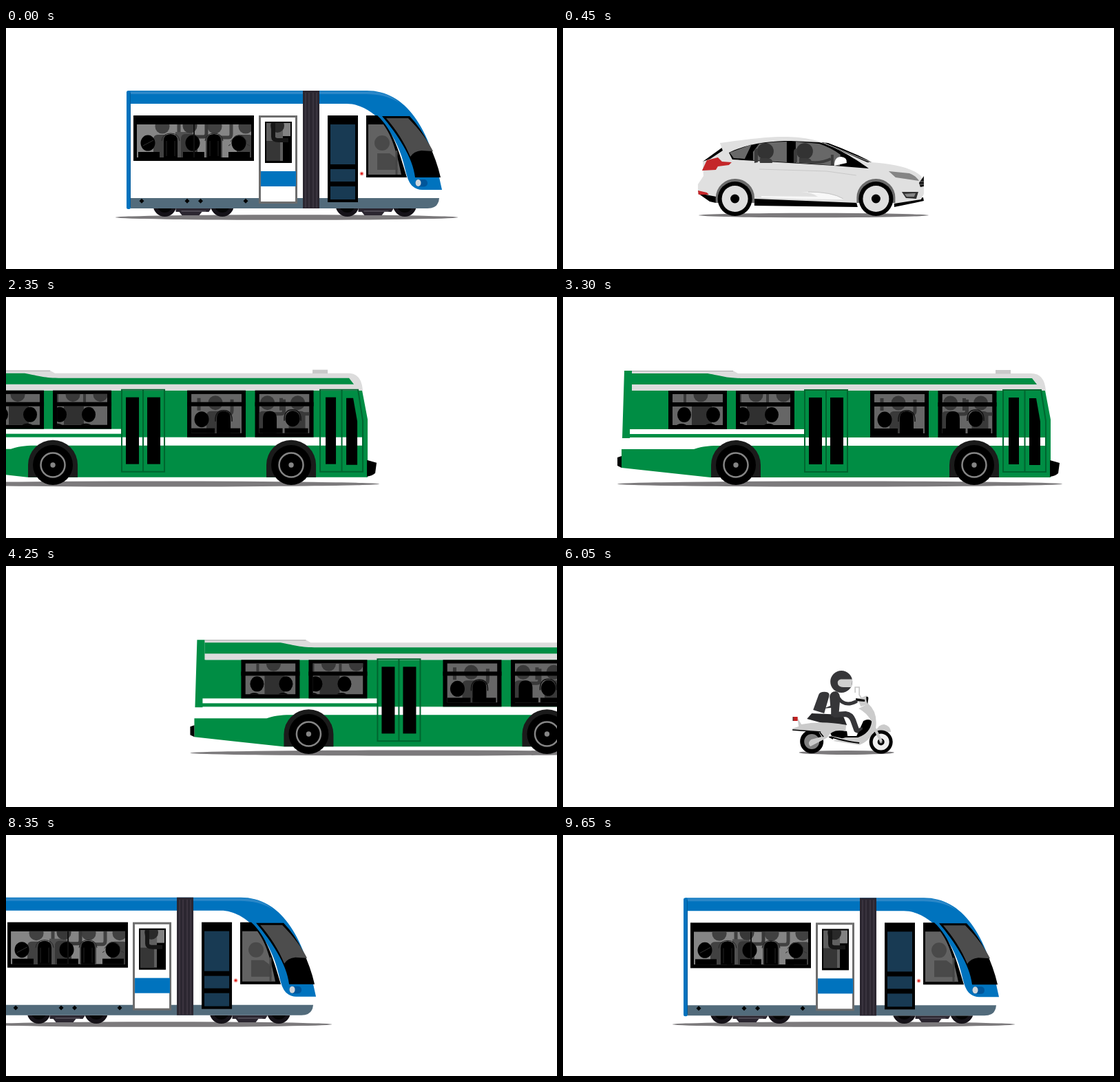
These frames come from a looping animation (800 px wide and 350 px high, 9700 ms). An HTML page:

```html
<!DOCTYPE html>
<html>
<head>
<meta charset="utf-8">
<style>
html, body { margin: 0; width: 100%; height: 100%; overflow: hidden; background: #fff }
svg { display: block }
</style>
</head>
<body>
<svg id="stage" width="800" height="350"></svg>
<script>
const LOOP = 9700, SLOT = 2000, SLIDE = 600, WIDTH = 800;
const BLUE = '#0073be', GREEN = '#008d44', YELLOW = '#ffbf00', DARK = '#363639', SHADOW = '#7c7a7c';

const path = (d, fill, more = '') => `<path d="${d}" fill="${fill}" ${more}/>`;
const line = (d, stroke, w = 1) => path(d, 'none', `stroke="${stroke}" stroke-width="${w}"`);
const rect = (x, y, w, h, fill, more = '') =>
  `<rect x="${x}" y="${y}" width="${w}" height="${h}" fill="${fill}" ${more}/>`;
const oval = (x, y, rx, ry, fill, more = '') =>
  `<ellipse cx="${x}" cy="${y}" rx="${rx}" ry="${ry}" fill="${fill}" ${more}/>`;
const dot = (x, y, r, fill, more) => oval(x, y, r, r, fill, more);
const each = (list, f) => list.map(f).join('');
const clip = (x, y, w, h, inner) =>
  `<svg x="${x}" y="${y}" width="${w}" height="${h}" viewBox="${x} ${y} ${w} ${h}">${inner}</svg>`;
const stander = (x, y, c = '#393939') =>
  dot(x, y, 10.5, c) + rect(x - 13, y + 12, 24, 50, c, 'rx="6"') +
  line(`M${x + 6} ${y + 16}h14q4 0 4-5v-16`, c, 5);
const head = (x, y) => oval(x, y, 10.5, 11.5, '#000');
const sitter = (x, y) => path(`M${x - 10} ${y + 20}v-21q0-11 10-11t10 11v21z`, '#000');
const headset = (x, y) => line(`M${x - 12} ${y + 3}v-4q1-12 12-12t12 12v4`, '#111', 1.5);

function tram() {
  const truck = x => each([x, x + 83.5], c => dot(c, 257, 17, '#151218') + dot(c, 257, 11, '#050505')) +
    path(`M${x + 16} 261h52l-4 6h-10l-4 5h-25l-4-5h-5z`, '#2b2630') +
    line(`M${x + 24} 266h36`, '#57525c', 1.5);
  const crowd = clip(190, 140, 166, 48,
    rect(190, 140, 166, 48, '#858585') +
    each([227, 303, 348], x => stander(x, 143, '#414141')) + rect(246, 151, 25, 40, '#505050') +
    stander(267, 142, '#383838') +
    each([206, 271, 338], x => head(x, 167)) +
    each([239, 302], x => path(`M${x - 10} 190v-26q0-10 10-10t10 10v26z`, '#000') +
      line(`M${x - 13} 164q1-11 13-11t13 11M${x - 6} 164v22M${x + 6} 164v22`, '#252525')) +
    line('M199 171l15-8M326 165q12-18 24 0M326 169l-3 2M350 169l4 2', '#303030') +
    each([192, 257, 323], x => rect(x, 180, 31, 9, '#000')) + rect(272, 140, 2, 48, '#111'));
  const body =
    path('M176 91H524C580 91 616 144 633 234L629 250Q624 262 612 262H176Z', '#fff') +
    path('M181 247H629Q628 262 612 262H181Z', '#526b7b') +
    path('M178 91H524C580 91 616 144 633 235H604C586 234 583 219 579 203C568 152 532 110 495 110H178Z', BLUE) +
    path('M181 92H524C546 92 561 99 572 109C556 99 540 96 523 96H181Z', '#2b87c8') +
    rect(175, 91, 6, 172, BLUE, 'rx="2.5"') + line('M180.5 94V260', '#005a9c') +
    rect(185, 127, 175, 66, '#000') + crowd +
    each([197, 263, 282.5, 348], x => path(`M${x - 3.5} 251.3l3.5-3.5 3.5 3.5-3.5 3.5z`, '#000')) +
    rect(368.5, 128.5, 53, 125, '#fff', 'stroke="#6d6d6d" stroke-width="3"') +
    rect(370, 208, 51, 22, BLUE) + rect(376, 136, 39, 60, '#000') +
    clip(378, 138, 35, 55, rect(378, 138, 24, 55, '#5f5f5f') + rect(402, 138, 11, 19, '#828282') +
      dot(394, 142, 10, '#292929') + rect(378, 164, 20, 30, '#363636') +
      line('M388 138v20q0 5 8 5h14', '#161616', 6)) +
    rect(431, 91, 24, 171, '#2b2630') + each([435, 440, 446, 451], x => line(`M${x} 94V261`, '#413a45', 1.5)) +
    rect(467, 127, 44, 126, '#000') +
    each([[140, 58], [205, 18], [230, 19]], ([y, h]) => rect(471, y, 36, h, '#183a53')) +
    dot(516.5, 211.5, 3, '#f3b0aa') + dot(516.5, 211.5, 1.7, '#d22') +
    path('M523 127H539C562 148 571 180 582 217H523Z', '#000') +
    path('M526 140H548C561 158 567 180 574 213H526Z', '#626262') +
    dot(546, 167, 11, '#494949') + path('M539 182h18l8 6 4 18h-30z', '#494949') + line('M567 178v35', '#444', 3) +
    path('M546 128H586C608 151 623 183 631 217H594C591 188 568 154 546 128Z', '#000') +
    path('M552 131H584C601 148 614 166 620 179L603 178Q592 179 587 187C579 167 566 147 552 131Z', '#4d4d4d') +
    rect(594, 220, 18, 10.5, '#00569a', 'rx="5"') + oval(598.5, 225, 4, 5, '#ced5db');
  return [0, oval(407.5, 275, 248.5, 3.8, SHADOW) + truck(230.5) + truck(495.5), body, ''];
}

function car() {
  const wheel = x => dot(x, 248, 25, '#000') + dot(x, 248, 19, '#dedede') + dot(x, 248, 6.5, '#000');
  const arch = x => path(`M${x - 28} 254v-8a28 27 0 0 1 56 0v8z`, '#6c6c6c');
  const rider = x => dot(x, 179, 12, '#333') + path(`M${x - 16} 196v-16q0-5 5-5v20zm8 0h18q1-7-8-7h-10z`, '#3b3b3b');
  const body =
    path('M277 247L425 253 427 260 277 258ZM195 240L221 243V254L212 252ZM480 254L522 246 523 251Q500 256 480 260Z', '#000') +
    path('M202 194L231 173 236 177 213 191Z', '#000') +
    path('M227 167C270 161 297 158 320 158C347 158 368 163 378 167L446 195C480 197 508 204 519 215L523 224V241L519 249 480 255 427 254 277 248 222 245 195 240V227L203 215 202 194 213 190 231 178Z', '#e0e0e0') +
    path('M201 207L208 192 224 188 230 194 244 195 240 199 224 201 221 206ZM195 236L208 239 211 242 196 242Z', '#c4272a') +
    path('M240 181C270 167 300 164 330 164L371 166C391 171 420 187 443 204L393 200 245 191Z', '#000') +
    path('M241 181L273 169 263 190 247 189ZM284 168Q304 165 324 165V195L275 192V180ZM337 165L371 168Q389 174 402 184L401 200 337 196Z', '#686868') +
    clip(275, 165, 130, 35, rider(293) + rider(350) + line('M352 194q20 4 36-4M390 184v15', '#3d3d3d', 4)) +
    path('M374 166L384 167C410 177 432 186 447 195H441C416 184 396 175 374 166Z', '#000') +
    path('M393 200Q393 187 403 187Q412 188 411 196Z', '#fff') +
    line('M284 205L382 208 425 214', '#c8c8c8') + line('M378 167L446 195', '#bbb') +
    path('M287 244L369 245Q362 239 345 238Q391 238 407 249Q345 249 287 246Z', '#f8f8f8') +
    line('M355 238Q390 238 406 248', '#c5c5c5') +
    path('M472 208L502 211Q512 215 516 222L482 217Z', '#858585') +
    path('M516 225L523 215V230L518 231Z', '#111') + line('M517 223h6M517 227h6', '#777') +
    path('M491 238L515 238 512 248 497 247Z', '#333') + path('M495 241L511 240 509 245 498 245Z', '#888') +
    arch(249) + arch(453.5);
  return [42, oval(363, 272, 167, 3.2, SHADOW), body, wheel(248.7) + wheel(453.5)];
}

function bus() {
  const wheel = x => dot(x, 244, 29, '#000') + dot(x, 244, 17.5, 'none', 'stroke="#858585" stroke-width="2.5"') + dot(x, 244, 3.7, '#858585');
  const arch = x => path(`M${x - 36} 262v-18a36 36 0 0 1 72 0v18z`, '#1b1b1b');
  const pane = (x, h, inner) => rect(x, 136, 85, h, '#000') +
    clip(x + 6, 141, 73, h - 11, rect(x + 6, 141, 73, h, '#666') + inner) + rect(x, 153, 85, 6, '#000');
  const small = (x, heads, riders) => pane(x, 56,
    each(riders, c => dot(x + c, 142, 10.5, '#393939') + line(`M${x + c - 23} 141v12`, '#393939', 4)) +
    rect(x + riders[0] - 13, 159, 29, 30, '#303030') +
    each(heads, c => oval(x + c, 171, 10, 11, '#000') + oval(x + c - 4, 188, 8, 4, '#000')));
  const large = (x, riders, people) => pane(x, 68,
    each(riders, c => stander(x + c, 154) + line(`M${x + c - 24} 147v18`, '#393939', 5)) + people +
    each([6, 43], c => rect(x + c, 191, 34, 8, '#000')));
  const body =
    path('M277 107H289V136H888L896 178V205H274Z', GREEN) +
    path('M288 107H435L442 111H868Q887 111 889 136H288Z', '#dcdcdc') +
    line('M288 107.5H435', '#aaa') + rect(816, 106, 22, 5.5, '#c9c9c9') +
    path('M288 111H398C421 115 425 118 452 118H869L876 127H288Z', GREEN) +
    path('M273 221H378C394 216 401 216 418 216H888V204H896V262H402L273 248Z', GREEN) +
    rect(285, 192, 254, 7, '#fff') + rect(285, 204, 603, 1.5, '#fff') +
    path('M267 233L273 231V248L267 245ZM895 237L909 241 907 256Q903 260 895 261Z', '#000') +
    small(341, [23, 65], [47]) + small(439, [10, 52], [29, 69]) +
    large(634, [41], head(655, 178) + sitter(687, 178) + headset(687, 178)) +
    large(732.5, [18, 62], sitter(754, 178) + head(787, 177) + headset(787, 177)) +
    line('M539 135H601V254H539ZM570 135V254M827 135H882L889 180V254H827ZM858.5 135V254', '#00652f', 2) +
    each([[545, 19], [576, 19], [835, 15]], ([x, w]) => rect(x, 146, w, 97, '#000')) +
    path('M865 147H875L881 181V244H865Z', '#000') +
    arch(439) + arch(785);
  return [-188, oval(590, 271.5, 323, 4, SHADOW), body, wheel(439) + wheel(785)];
}

function scooter() {
  const GREY = '#cbcbcb';
  const limb = (d, w) => path(d, 'none', `stroke="${DARK}" stroke-width="${w}" stroke-linecap="round" stroke-linejoin="round"`);
  const all =
    dot(361, 255, 17, '#000') + dot(361, 255, 11, '#818181') +
    path('M386 239Q396 235 412 240L413 247H426L436 225Q447 219 452 231Q450 248 438 253L426 257Q408 250 390 247Z', '#000') +
    path('M429 207L443 200Q457 212 454 235L463 253 458 257 450 241Q444 255 430 260L392 254 410 249 428 249Q446 243 448 226Q441 213 429 207Z', GREY) +
    line('M388 248Q410 255 430 257', '#000', 2) +
    path('M354 222L361 214 406 216 412 231 380 229Z', '#29292b') +
    path('M340 220L346 230Q375 224 411 231L410 240Q390 236 384 249L359 262Q354 257 360 252L375 248 371 241 333 239V236L342 233Z', GREY) +
    line('M333 238L374 241M373 242l5 6M386 248l6 3', '#000', 1.5) +
    rect(333.5, 219, 7, 6, '#c32020') + line('M334 219V225', '#333') +
    path('M454 240Q458 230 466 230Q475 232 476 241Z', GREY) +
    dot(461.5, 255.5, 17, '#000') + dot(461.5, 255.5, 12, '#efefef') + dot(461.5, 255.5, 5, '#000') + dot(461.5, 255.5, 2, '#999') +
    line('M453 237L462 255', GREY, 4) +
    path('M428 193L441 188 443 201 432 204Z', GREY) + line('M424 184V176H430V187L433 192', '#c8c8c8', 1.7) +
    path('M440 190Q444 189 443 194L442 200Q440 197 440 190ZM425 192L438 194V197L425 196Z', '#111') +
    path('M371 187Q373 182 382 183Q388 184 386 190L379 214 363 209Z', DARK) +
    path('M387 190Q388 182 396 182Q403 184 402 195L400 218H389L389 206 378 207 388 203Z', DARK) +
    limb('M400 192Q409 205 425 197', 5) + limb('M395 216L410 215Q418 216 421 224L426 238', 8) +
    path('M423 238L434 234 435 237 427 243Z', DARK) +
    dot(404, 168, 16, DARK) + path('M420 164.5H403Q397 166 399 172Q401 176 407 176H419Z', '#d0d0d0');
  return [-3.5, oval(411.5, 271, 69, 3, SHADOW), '', all];
}

function taxi() {
  const wheel = x => dot(x, 250, 23, '#4b4b4b') + dot(x, 250, 13, '#000') + dot(x, 250, 7.5, '#b4b4b4');
  const arch = x => path(`M${x - 29} 256v-9q0-28 28-28t29 28v10z`, '#000') +
    line(`M${x - 24} 228q8-8 23-8t23 8`, '#7a6a35', 2);
  const rider = x => dot(x, 190, 10.5, '#333') + path(`M${x - 17} 207v-10q2-14 8-14l-2 24zm12-7h13q5 1 4 8h-17z`, '#383838');
  const checks = each([0, 1, 2], r => each([...Array(7).keys()], i =>
    rect(249 + 8 * i + r % 2 * 4, 204 + r * 2.4, 4, 2.4, '#000')));
  const shade = each([[263, 265.5, 42, 5.5], [312, 271, 33, 5], [412, 267, 92, 8], [524, 271, 34, 5], [550, 265.5, 30, 5]],
    e => oval(...e, SHADOW));
  const body =
    path('M335 250H499V259L335 255Z', '#000') +
    path('M388 175L391 159Q393 156 395 159L398 175Z', '#f3b51f') +
    path('M222 227L232 225 233 207Q234 201 243 200L290 199C304 193 312 177 328 174L428 173C448 176 466 196 483 206L560 213Q576 214 580 226V235H588L590 248 583 256 550 261 500 250 340 250 283 255 224 248Q220 238 222 227Z', YELLOW) +
    path('M289 200C303 193 310 181 323 177L323 180 297 202ZM437 179Q464 193 483 206L476 205Q456 195 437 179Z', '#000') +
    path('M328 204L337 183Q341 178 350 178H430C447 183 459 197 470 209Z', '#000') +
    path('M334 203L343 184Q346 181 354 181H386V206ZM394 181H428Q445 186 457 199L459 208 396 207Z', '#686868') +
    clip(330, 178, 135, 30, rider(351) + rider(407) + line('M413 207l12-3M445 198v9M449 198v9', '#383838', 3)) +
    path('M385 178H392L396 208H388Z', '#f4b61d') + line('M328 174H428M483 206L560 213', '#8b7011', .7) + checks +
    path('M232 223L233 209Q234 205 241 205Q245 213 244 222Z', '#c62328') + rect(232, 221, 12, 3.5, '#f6ddd2') +
    path('M222 226H288L285 230H230V246L222 244Z', '#ffd45a') + line('M230 246H284', '#e4a51d') +
    path('M224 245L283 247V255L224 249Z', '#d99a20') +
    path('M346 231L478 235V238L346 234Z', '#eeae12') + rect(338, 243, 160, 2.5, '#ffdb68') +
    path('M338 245L497 248V256L338 253Z', '#6c6b5d') +
    path('M554 226Q558 223 578 224L581 234H554Z', '#aaa') + line('M549 235H585', '#ffd45a', 2) +
    line('M549 241H586', '#dda01b') + path('M549 247L587 248 583 256Q570 261 549 260Z', '#d99a20') +
    path('M588 238L590 237V251H586Z', '#000') +
    arch(312) + arch(522);
  return [0, shade, body, wheel(312) + wheel(522)];
}

const stage = document.getElementById('stage');
const rides = [tram, car, bus, scooter, taxi].map(make => {
  const [x, under, body, over] = make();
  stage.insertAdjacentHTML('beforeend', `<g>${under}<g>${body}</g>${over}</g>`);
  const el = stage.lastElementChild;
  return { x, el, body: [...el.children].find(c => c.tagName === 'g') };
});

// Symmetric cubic-bezier(a, 0, 1 - a, 1), solved by bisection
function ease(p) {
  if (p >= 1) return 1;
  const a = .764;
  let lo = 0, hi = 1;
  for (let i = 0; i < 30; i++) {
    const s = (lo + hi) / 2, r = 1 - s;
    if (3 * a * s * r * r + 3 * (1 - a) * s * s * r + s ** 3 < p) lo = s; else hi = s;
  }
  return lo * lo * (3 - 2 * lo);
}

function draw(now) {
  const t = now % LOOP, k = Math.floor(t / SLOT);
  const shift = WIDTH * ease(t % SLOT / SLIDE);
  const bob = .4 * Math.sin(t * Math.PI * 2 / 300);
  rides.forEach(({ x, el, body }, i) => {
    const leaving = i === k, coming = i === (k + 1) % rides.length;
    el.style.display = leaving && shift < WIDTH || coming ? '' : 'none';
    el.setAttribute('transform', `translate(${x + shift - (coming ? WIDTH : 0)})`);
    body.setAttribute('transform', `translate(0 ${bob})`);
  });
}

const start = performance.now();
function tick() {
  draw(performance.now() - start);
  requestAnimationFrame(tick);
}
tick();
</script>
</body>
</html>
```
